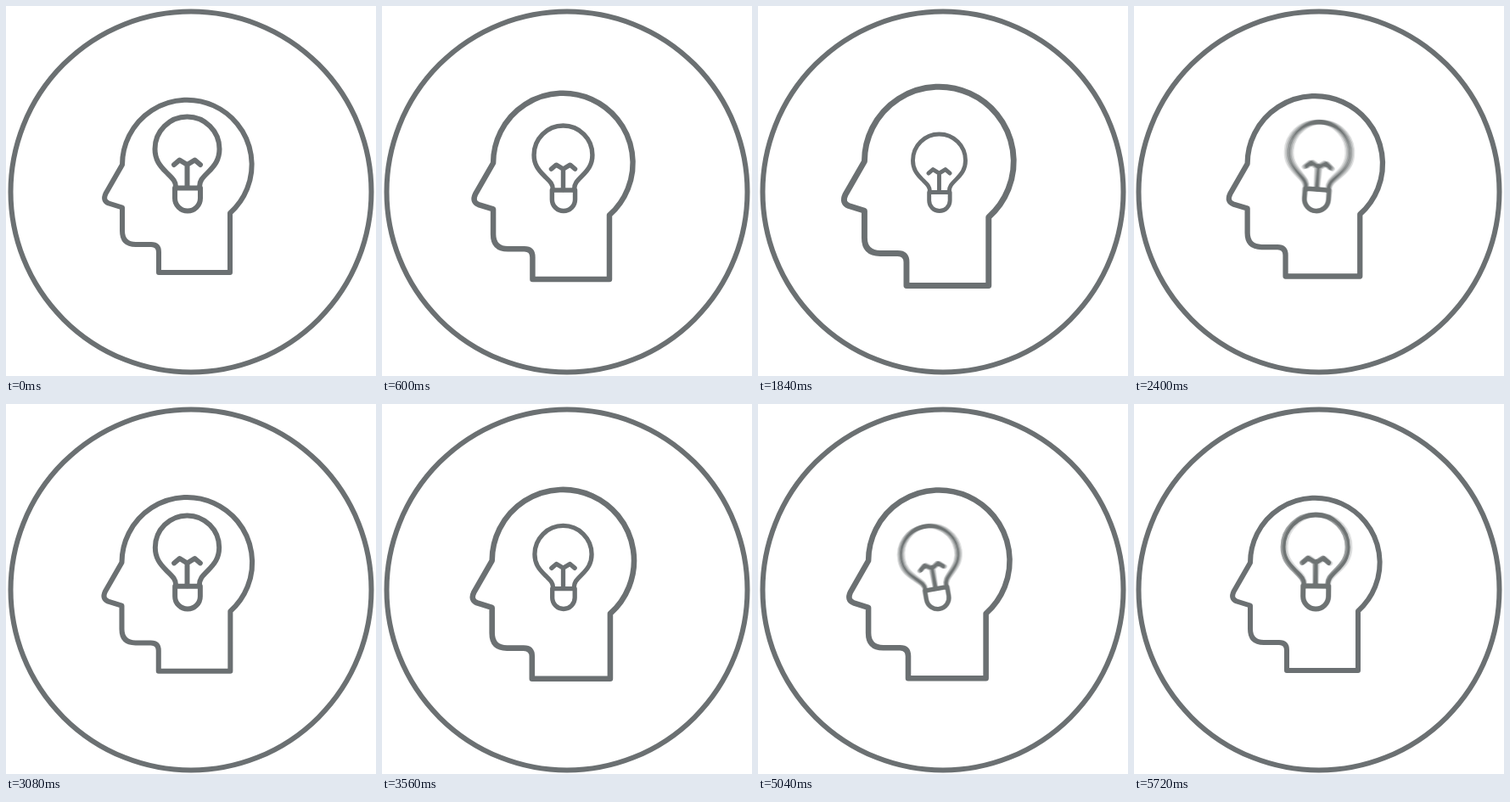
These frames come from a looping animation (436 px wide and 436 px high, 5.76 s). An HTML page:

```html
<!DOCTYPE html>
<html lang="en">
<head>
<meta charset="utf-8">
<title>Idea</title>
<style>
  html, body { margin: 0; width: 100%; height: 100%; overflow: hidden; background: #fff; }
  svg { display: block; width: 100vw; height: 100vh; }
  #bulb { isolation: isolate; }
  #bulb use { mix-blend-mode: plus-lighter; }
</style>
</head>
<body>
<svg viewBox="0 0 436 436" fill="none" stroke="#6b7072" stroke-width="6" stroke-linecap="round" stroke-linejoin="round">
  <defs>
    <g id="bulbShape">
      <path d="M200 213C200 206 196 203 189 196C181 188 175.5 181 175.5 168.5A38 38 0 0 1 251.5 168.5C251.5 181 246 188 238 196C231 203 228 206 228 213"/>
      <path d="M199 214.5H229V226.5A15 15 0 0 1 199 226.5Z"/>
      <path d="M213.5 187V214M198 187L204.500 181.500L213.500 187L222.500 181.500L229 187"/>
    </g>
  </defs>
  <circle cx="218" cy="219" r="212.500"/>
  <path id="head" d="M137 187A76.300 76.300 0 1 1 264 244V314H180V290Q180 281 171 281H153Q137 281 137 265V237.500L121 232.500Q113.500 229.500 117.500 221Z"/>
  <g id="bulb"></g>
</svg>
<script>
const CYCLE = 2880;
const SAMPLES = 5;
const SHUTTER = 24;
const head = document.getElementById('head');
const bulb = document.getElementById('bulb');

const copies = Array.from({ length: SAMPLES }, () => {
  const copy = document.createElementNS('http://www.w3.org/2000/svg', 'use');
  copy.setAttribute('href', '#bulbShape');
  return bulb.appendChild(copy);
});

function ease(t, start, end) {
  const u = Math.min(1, Math.max(0, (t - start) / (end - start)));
  return u * u * (3 - 2 * u);
}

const growth = t => ease(t, 60, 1290) - ease(t, 1440, 2840);

// Two swings to each side while the head shrinks
function tilt(t) {
  return t < 2000 || t > 2840 ? 0 : -15 * Math.sin((t - 2000) / 420 * 2 * Math.PI);
}

function place(node, x, y, scale, angle = 0) {
  node.setAttribute('transform',
    `translate(${x} ${y}) rotate(${angle}) scale(${scale}) translate(${-x} ${-y})`);
}

function draw(now) {
  const t = now % CYCLE;
  const p = growth(t);
  const swinging = t > 1980 && t < 2860;
  place(head, 213, 212.5, 1 + 0.19 * p);

  // Averaged copies blur the swing along its arc
  copies.forEach((copy, i) => {
    const offset = swinging ? (i / (SAMPLES - 1) - 0.5) * SHUTTER : 0;
    place(copy, 213.5, 241.5, 1 - 0.23 * p, tilt(t + offset));
    copy.setAttribute('opacity', swinging ? 1 / SAMPLES : 1);
    copy.setAttribute('display', swinging || i === 0 ? 'inline' : 'none');
  });
}

const start = performance.now();
function tick() {
  draw(performance.now() - start);
  requestAnimationFrame(tick);
}
tick();
</script>
</body>
</html>
```
